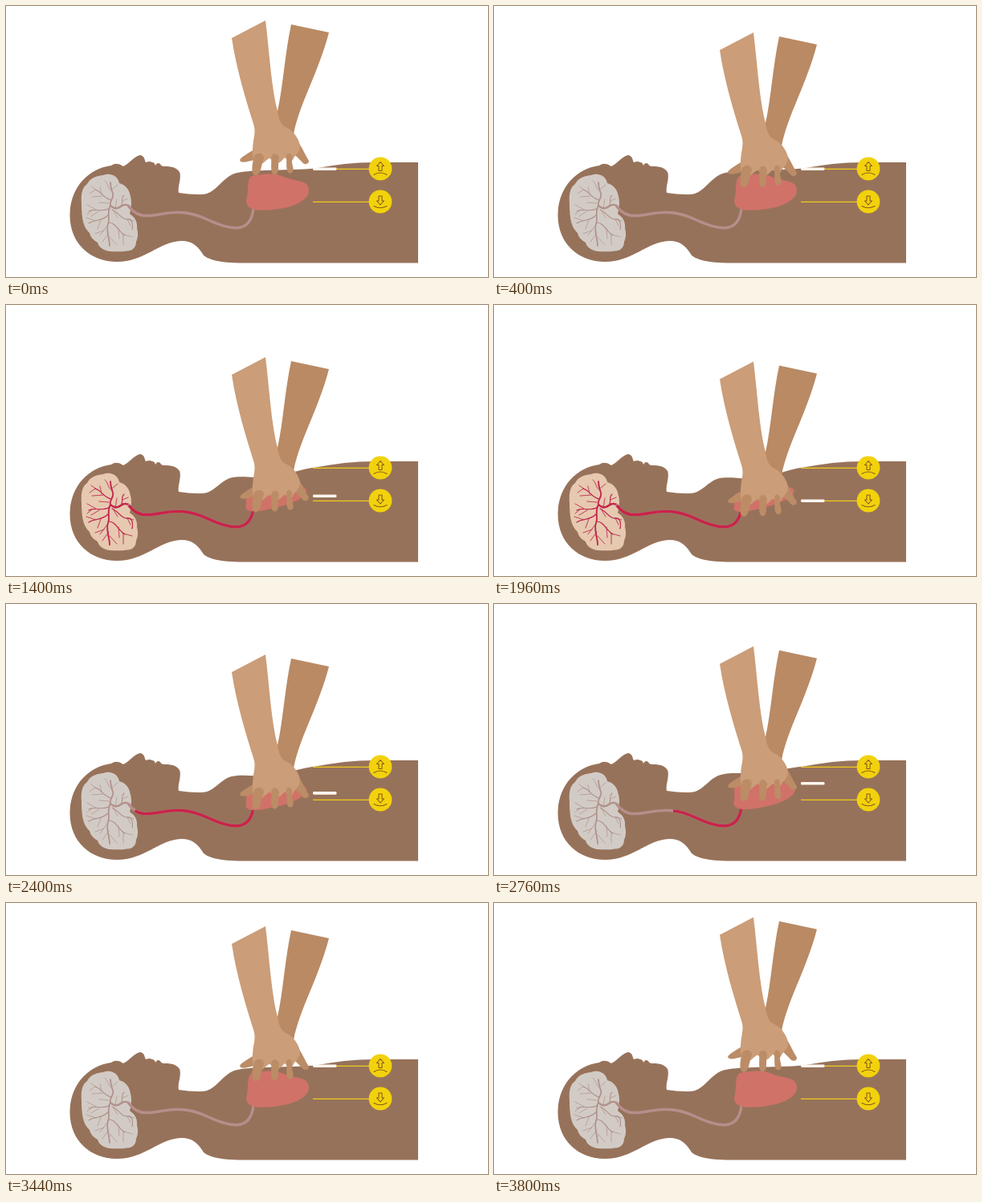
Animation of 600 by 338 pixels, one loop 3.84 s. Source, as an HTML page:

```html
<!DOCTYPE html>
<html lang="en">
<head>
<meta charset="utf-8">
<title>Chest compression</title>
<style>
  html, body { margin: 0; width: 100%; height: 100%; overflow: hidden; background: #fff; }
  svg { display: block; width: 600px; height: 338px; }
  .line { fill: none; stroke-linecap: round; stroke-linejoin: round; }
  .icon { fill: none; stroke: #8a5a1c; stroke-width: 1.1; stroke-linejoin: round; stroke-linecap: round; }
</style>
</head>
<body>
<svg viewBox="0 0 600 338">
  <defs>
    <g id="vessels" class="line">
      <path stroke-width="2.2" d="M155 251C151 247 147 247 143 250S135 254 130 249"/>
      <path stroke-width="1.7" d="M130 249C128 243 135 240 133 234S130 226 130 220M130 249C125 257 130 264 127 272S129 290 129 299"/>
      <path stroke-width="1.1" d="M129 252C120 258 113 252 103 256M127 261C119 269 110 266 103 271M131 242C121 240 119 231 111 229M128 270C137 270 140 282 148 286M143 250C147 244 142 240 147 236M132 254C141 258 144 267 151 266S158 274 157 279"/>
      <path stroke-width=".7" d="M132 231C126 228 128 222 123 218M119 235L117 226M121 237L107 238M133 228L139 223M112 254L101 248M116 256L106 262M118 267L114 278M112 268L100 264M126 274L117 286M128 283L120 294M122 280L111 284M129 288L138 298M140 277L141 290M146 285L146 298M146 285L157 288M151 266L155 274M151 266L159 268M134 256L139 264M145 243L152 240M136 253L138 241M128 246L116 245M107 255L101 260M113 230L106 225M111 229L104 234"/>
    </g>
    <path id="artery" pathLength="1" d="M308 253C304 286 278 279 250 266C230 257 214 255 190 260C172 263 163 263 153 250"/>
  </defs>

  <path id="body" fill="#97725a"/>

  <path id="brain" d="M94 247C93 234 95 226 101 222C106 212 116 212 121 211C131 207 140 213 141 221C149 223 154 230 154.500 236C157 243 156 253 154 259C159 263 164 267 163 277C165 284 164 290 162 294C162 302 156 306 150 305.500C142 307 135 306 129 306C121 305 115 300 114 295C107 291 105 287 104 283C96 276 94 264 94 247Z"/>
  <use href="#vessels" stroke="#b0908a"/>
  <use href="#vessels" id="redVessels" stroke="#c9224b"/>

  <use href="#artery" class="line" stroke="#b78e8b" stroke-width="3.4"/>
  <use href="#artery" id="flow" fill="none" stroke="#c9224b" stroke-width="3.4"/>
  <path id="heart" fill="#d07268" d="M299 243C303 230 299 216 306 212C320 209 336 208 346 213C358 219 377 216 377 230C377 243 356 251 340 253C320 256 299 257 299 243Z"/>

  <path stroke="#efcb1f" stroke-width="1.2" d="M382 203.400H455M382 244.400H455"/>
  <g fill="#f2d20c"><circle cx="466" cy="203" r="14.400"/><circle cx="466" cy="244" r="14.400"/></g>
  <path class="icon" d="M466 194.500L470.500 199.500H468V205.500H464V199.500H461.500ZM458 210.500Q466 205.500 474 210.500"/>
  <path class="icon" d="M466 248L470.500 243H468V237H464V243H461.500ZM458 249.500Q466 254 474 249.500"/>
  <rect id="bar" x="382" width="29.5" height="3.6" rx="1.4" fill="#fff8f0"/>

  <g id="hands">
    <path fill="#b98a64" d="M355 23L402 33C389 83 365 122 358 160C356 171 340 172 336 160C333 150 336 141 338 131C345 100 347 60 355 23Z"/>
    <path fill="#bb8c66" d="M309 179C301 184 293 188 291 192C292 197 301 194 309 192Z"/>
    <path fill="#bb8c66" d="M350 156C364 164 368 178 377 193C377 198 371 199 367 193L356 182Z"/>
    <path fill="#cb9d78" d="M281 40L323 18C328 58 330 100 338 131C340 143 342 148 350 152C360 157 369 172 365 180C362 186 359 187 357 192C353 196 350 192 347 189C344 192 341 196 338 196C333 196 331 191 328 190C324 191 319 199 314 198C306 197 306 183 308 168C310 158 310 153 308 147C299 118 287 80 281 40Z"/>
    <path fill="#bb8c66" d="M309 187C314 181 321 184 321 190C317 199 318 212 310 211C304 210 307 194 309 187ZM330 190C331 182 339 183 340 190C338 197 341 210 335 210.500C328 211 331 197 330 190ZM349 186C353 181 357 185 356 191C355 198 361 206 355 208.500C347 210 350 194 349 186Z"/>
  </g>
</svg>
<script>
const LOOP = 3840;
const PRESS = [[0, 0], [400, 15], [1000, 36], [1400, 47], [1880, 53], [2400, 45], [3120, 23], [3740, 0], [3840, 0]];
const FLOW = [[0, 0], [440, 0], [1080, 1], [2340, 1], [2820, .52], [3160, 0], [3840, 0]];
const GLOW = [[0, 0], [1080, 0], [1400, 1], [2080, 1], [2320, 0], [3840, 0]];

const el = Object.fromEntries([...document.querySelectorAll("svg > [id]")].map(e => [e.id, e]));
const clamp = v => Math.max(0, Math.min(1, v));
const segment = (keys, t) => Math.max(0, keys.findIndex(k => k[0] > t) - 1);

function linear(keys, t) {
  const i = segment(keys, t), [a, b] = [keys[i], keys[i + 1]];
  return a[1] + (b[1] - a[1]) * (t - a[0]) / (b[0] - a[0]);
}

function smooth(keys, t) {
  const i = segment(keys, t), last = keys.length - 1;
  const slope = n => {
    const a = keys[Math.max(0, n - 1)], b = keys[Math.min(last, n + 1)];
    return (b[1] - a[1]) / (b[0] - a[0]);
  };
  const [a, b] = [keys[i], keys[i + 1]], h = b[0] - a[0], u = (t - a[0]) / h;
  const ease = u * u * (3 - 2 * u);
  return a[1] + (b[1] - a[1]) * ease
    + h * u * (1 - u) * (slope(i) * (1 - u) - slope(i + 1) * u);
}

function mix(from, to, k) {
  return `rgb(${from.map((v, i) => Math.round(v + (to[i] - v) * k))})`;
}

// The chest surface sinks under the hands by p, from 0 to 1.
function bodyPath(p) {
  return `M131 199Q138 194 146 200C153 197 160 187 167 186C173 187 172 192 174 195
    Q179 193 182 195Q185 195 186 199Q188 194 192 197Q193 200 197 200
    C206 200 212 201 216 207C219 215 213 226 215 233Q234 236 248 234.500
    C260 232 267 ${219 + p} 279 ${211.5 + 5 * p}
    C288 ${206.5 + 8 * p} 298 ${206.5 + 9 * p} 310 ${205.5 + 11 * p}
    C328 ${204.5 + 14 * p} 345 ${204.5 + 8 * p} 358 ${204 + 5 * p}
    C368 ${203.5 + 2.5 * p} 376 203.500 385 202.500C410 198 432 195 460 195H513V320.500H290
    C272 320 254 318 246 311C239 300 233 293 218 293
    C190 294 173 319 138 319C106 319 79.500 297 79.500 261C79.500 228 101 203 131 199Z`;
}

function draw(now) {
  const t = now % LOOP;
  const drop = smooth(PRESS, t), p = clamp((drop - 17.5) / 34.5);
  const glow = linear(GLOW, t), flow = linear(FLOW, t);
  el.hands.setAttribute("transform", `translate(0 ${drop})`);
  el.body.setAttribute("d", bodyPath(p));
  el.bar.setAttribute("y", 201.4 + 41 * p);
  el.heart.setAttribute("transform",
    `rotate(${-11 * p} 305 256) translate(0 ${256 + 4 * p}) scale(1 ${1 - .42 * p}) translate(0 -256)`);
  el.brain.setAttribute("fill", mix([210, 203, 197], [230, 201, 176], glow));
  el.redVessels.setAttribute("opacity", glow);
  el.flow.setAttribute("stroke-dasharray", `${flow} 2`);
  el.flow.setAttribute("visibility", flow > 0 ? "visible" : "hidden");
  requestAnimationFrame(() => draw(performance.now() - start));
}

const start = performance.now();
draw(0);
</script>
</body>
</html>
```
